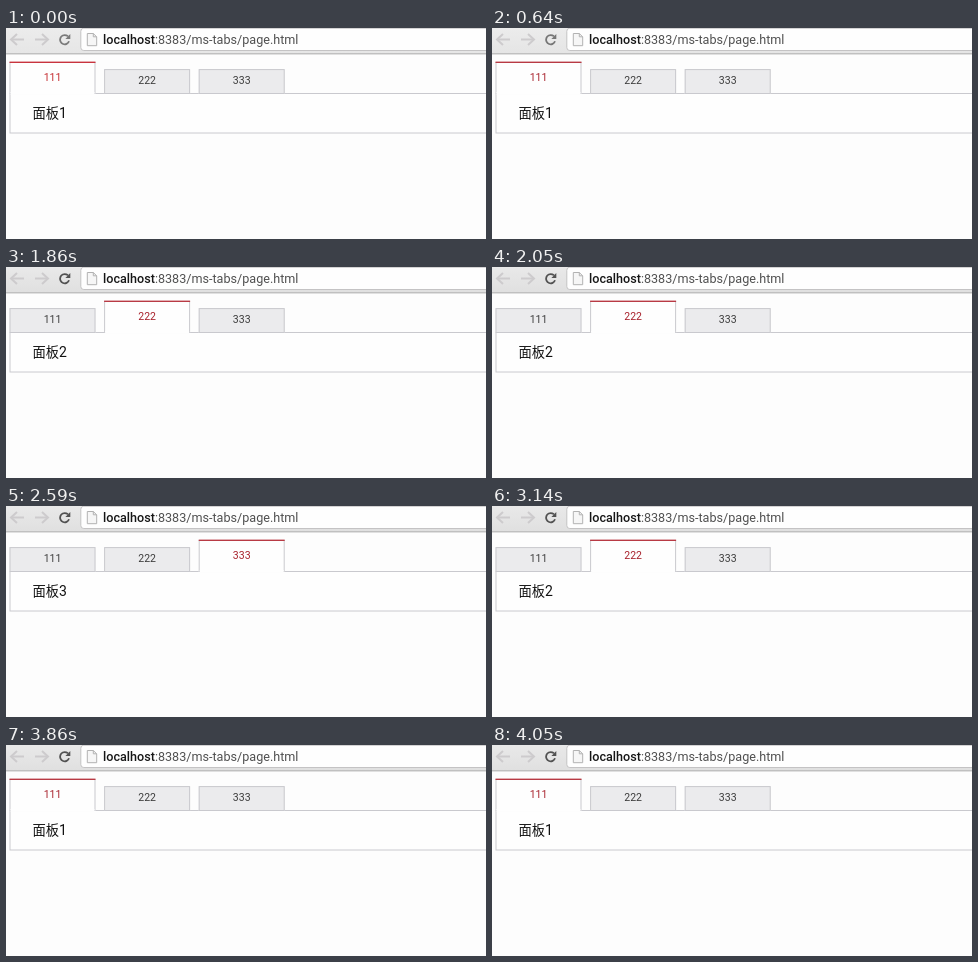
Recreate the animation shown at these times as an HTML page with a canvas. Size 480 by 211 pixels, loop 4550 ms.

```html
<!DOCTYPE html>
<html lang="zh">
<head>
<meta charset="utf-8">
<title>Tabs</title>
<style>
html, body { margin: 0; width: 100%; height: 100%; overflow: hidden; background: #fdfdfd; }
canvas { display: block; }
</style>
</head>
<body>
<canvas id="stage" width="480" height="211"></canvas>
<script>
const LOOP = 4550;
const ctx = document.getElementById('stage').getContext('2d');
const SANS = 'Roboto, "Liberation Sans", sans-serif';
const CJK = '"Noto Sans CJK SC", "Noto Sans CJK", sans-serif';
const LINE = '#c9c9ce';
const LEFT = 3.5, GAP = 94.6, WIDTH = 86;
// [start time, selected tab]
const STEPS = [[0, 0], [1860, 1], [2590, 2], [3140, 1], [3860, 0]];

const ramp = (t, a, b) => Math.min(1, Math.max(0, (t - a) / (b - a)));
const mix = (a, b, k) => `rgb(${a.map((v, i) => Math.round(v + (b[i] - v) * k))})`;
const gray = (a, b, k) => mix([a, a, a], [b, b, b], k);

function rect(x, y, w, h, color) {
  ctx.fillStyle = color;
  ctx.fillRect(x, y, w, h);
}

function box(x, y, w, h, fill) {
  rect(x, y, w, h, fill);
  ctx.lineWidth = 1;
  ctx.strokeStyle = LINE;
  ctx.strokeRect(x + 0.5, y + 0.5, w - 1, h - 1);
}

function text(str, x, y, font, color, align = 'left') {
  ctx.font = font;
  ctx.fillStyle = color;
  ctx.textAlign = align;
  ctx.fillText(str, x, y);
  return ctx.measureText(str).width;
}

function path(points, color, close) {
  ctx.beginPath();
  points.forEach(([x, y]) => ctx.lineTo(x, y));
  if (close) {
    ctx.closePath();
    ctx.fillStyle = color;
    ctx.fill();
  } else {
    ctx.strokeStyle = color;
    ctx.stroke();
  }
}

function arrow(x, dir) {
  ctx.lineWidth = 2;
  path([[x + 6 * dir, 6], [x, 11.5], [x + 6 * dir, 17]], '#cdcbcd');
  path([[x + dir, 11.5], [x + 13 * dir, 11.5]], '#cdcbcd');
}

function reload(color) {
  ctx.lineWidth = 1.8;
  ctx.strokeStyle = color;
  ctx.beginPath();
  ctx.arc(58.7, 11.7, 4.6, 0.35, Math.PI * 1.75);
  ctx.stroke();
  path([[64.3, 6], [64.3, 11], [59.4, 11]], color, true);
}

function pageIcon() {
  const edge = [[81.3, 5.5], [87.3, 5.5], [90.7, 8.8], [90.7, 17.7], [81.3, 17.7], [81.3, 5.5]];
  ctx.lineWidth = 1;
  path(edge, '#f6f6f6', true);
  path(edge, '#b2b2b2');
  path([[87.3, 5.5], [87.3, 8.8], [90.7, 8.8]], '#b2b2b2');
}

function toolbar(k) {
  const bg = ctx.createLinearGradient(0, 0, 0, 25);
  bg.addColorStop(0, gray(236, 233, k));
  bg.addColorStop(1, gray(230, 224, k));
  rect(0, 0, 480, 25.3, bg);
  rect(0, 25.2, 480, 1.2, '#b4b3b4');

  ctx.beginPath();
  ctx.roundRect(74.8, 0.2, 420, 22.3, 3);
  ctx.fillStyle = '#fefefe';
  ctx.fill();
  ctx.lineWidth = 1;
  ctx.strokeStyle = '#c4c3c4';
  ctx.stroke();

  arrow(5, 1);
  arrow(42, -1);
  reload(gray(122, 82, k));
  pageIcon();
  const w = text('localhost', 97, 16, '500 12.6px ' + SANS, '#161616');
  text(':8383/ms-tabs/page.html', 97 + w, 16, '12.6px ' + SANS, '#505050');
}

function tab(i, on, k) {
  const x = LEFT + GAP * i;
  if (on) {
    box(x, 34, WIDTH, 32, '#fefefe');
    rect(x + 1, 64, WIDTH - 2, 2.5, '#fefefe');
    rect(x, 33.6, WIDTH, 1.4, mix([200, 52, 62], [184, 58, 68], k));
  } else {
    box(x, 41.1, WIDTH, 24.9, '#ebebed');
  }
  const color = on ? mix([196, 42, 46], [168, 34, 44], k) : '#3c3c3c';
  text(String(i + 1).repeat(3), x + WIDTH / 2, on ? 53 : 56, '10.5px ' + SANS, color, 'center');
}

function draw(t) {
  const sel = STEPS.filter(s => s[0] <= t).pop()[1];
  rect(0, 0, 480, 211, '#fdfdfd');
  toolbar(ramp(t, 590, 1050));
  box(LEFT, 65, 490, 40.5, '#fefefe');
  const fade = ramp(t, 50, 550);
  for (let i = 0; i < 3; i++) tab(i, i === sel, fade);
  const w = text('面板', 26.5, 90, '13.3px ' + CJK, '#111');
  text(String(sel + 1), 26.5 + w, 90, '14px ' + SANS, '#111');
}

const start = performance.now();
function loop() {
  draw((performance.now() - start) % LOOP);
  requestAnimationFrame(loop);
}
loop();
</script>
</body>
</html>
```
